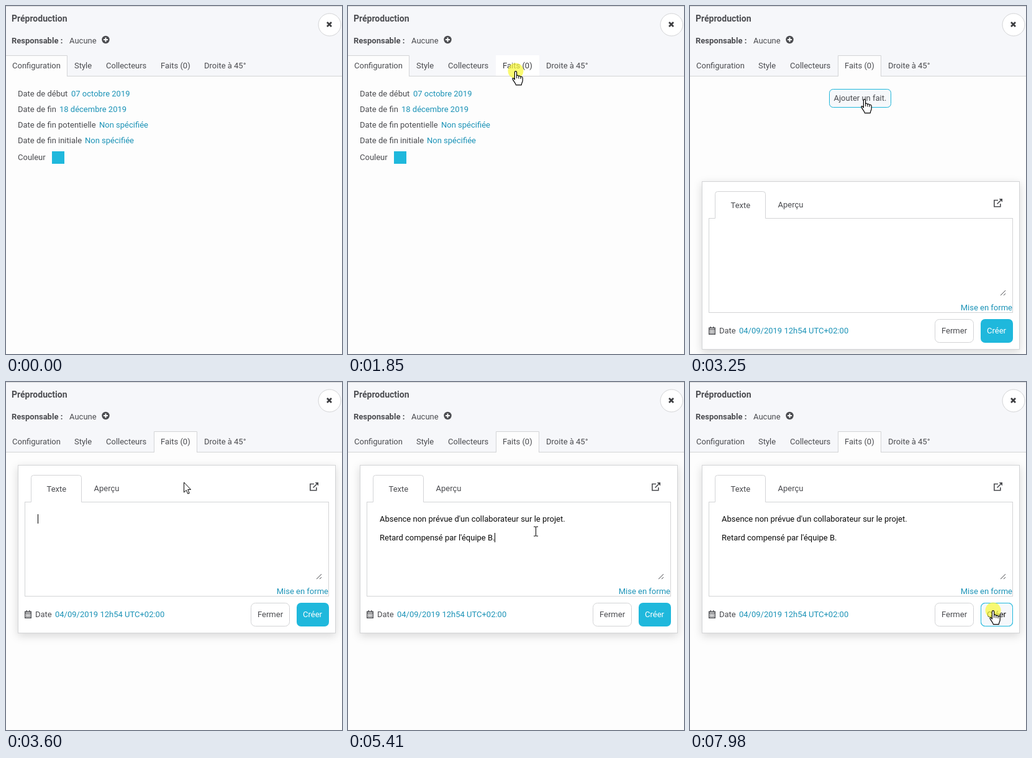
Animation, 541 px wide and 558 px high, one loop 8 s. Source, as an HTML page:

```html
<!DOCTYPE html>
<html lang="fr">
<head>
<meta charset="utf-8">
<style>
html, body { margin: 0; width: 100%; height: 100%; overflow: hidden; background: #fdfdfd; }
svg { display: block; font: 13px Roboto, sans-serif; fill: #4b4c50; }
.b { font-weight: 700; }
.link { fill: #1c93b7; }
.ink { fill: #0c0c0c; }
.box { fill: #fff; stroke: #d3d4d6; }
.hot { fill: #f6f8fb; stroke: #1fb8dc; }
.blue { fill: #1fb8dc; }
.line { fill: none; stroke: #d3d4d6; }
.icon { fill: none; stroke: #4b4c50; }
.cur { fill: #fff; stroke: #000; stroke-linejoin: round; }
#card { filter: drop-shadow(0 4px 7px rgba(0,0,0,.15)); }
</style>
</head>
<body>
<svg width="541" height="558" viewBox="0 0 541 558">
  <rect width="541" height="558" fill="#fdfdfd"/>
  <rect width="541" height="112" fill="#f6f7fa"/>
  <path class="line" d="M0 .5H541M0 112.5H541"/>
  <text class="b" x="9" y="25" font-size="14">Préproduction</text>
  <text class="b" x="9" y="60">Responsable :</text>
  <text x="102" y="60">Aucune</text>
  <circle cx="160.5" cy="54" r="6.2"/>
  <path d="M157 54H164M160.5 50.5V57.5" stroke="#fff" stroke-width="2"/>
  <circle class="box" cx="521" cy="30" r="18"/>
  <path d="M517 26L524 33M524 26L517 33" stroke="#3c3d40" stroke-width="2.7"/>

  <path id="tab1" d="M0 79.5H98.5V113H0" fill="#fdfdfd"/>
  <path id="edge1" class="line" d="M0 79.5H98.5V113"/>
  <rect id="tabHover" x="238" y="79" width="70" height="33" fill="#fff"/>
  <g id="tab4">
    <path d="M238.5 113V79.5H307.5V113" fill="#fdfdfd"/>
    <path class="line" d="M238.5 113V79.5H307.5V113"/>
  </g>
  <text x="10" y="100">Configuration</text>
  <text x="110" y="100">Style</text>
  <text x="161" y="100">Collecteurs</text>
  <text id="facts" x="249" y="100">Faits (0)</text>
  <text x="319" y="100">Droite à 45°</text>

  <g id="config">
    <text x="19" y="145">Date de début</text><text class="link" x="105" y="145">07 octobre 2019</text>
    <text x="19" y="170">Date de fin</text><text class="link" x="86" y="170">18 décembre 2019</text>
    <text x="19" y="195">Date de fin potentielle</text><text class="link" x="150" y="195">Non spécifiée</text>
    <text x="19" y="220">Date de fin initiale</text><text class="link" x="127" y="220">Non spécifiée</text>
    <text x="19" y="247">Couleur</text>
    <rect class="blue" x="74" y="233" width="20" height="20"/>
  </g>

  <g id="add">
    <rect class="box" x="224.5" y="133.5" width="99" height="29" rx="6"/>
    <rect id="addHover" class="hot" x="224.5" y="133.5" width="99" height="29" rx="6"/>
    <text x="231.5" y="152">Ajouter un fait.</text>
  </g>

  <g id="panel">
    <rect id="card" class="box" x="19.5" y="133.5" width="511" height="269"/>
    <rect class="line" x="30.5" y="192.5" width="489" height="151"/>
    <path class="box" d="M40.5 193.5V153.5Q40.5 149.5 44.5 149.5H117.5Q121.5 149.5 121.5 153.5V193.5" style="stroke:none"/>
    <path class="line" d="M40.5 192.5V153.5Q40.5 149.5 44.5 149.5H117.5Q121.5 149.5 121.5 153.5V192.5"/>
    <text x="65.5" y="176">Texte</text>
    <text x="141.5" y="175">Aperçu</text>
    <path class="icon" stroke-width="1.6" d="M496 163.5H489.8V173.7H499.8V169M494.5 169.5L501.5 162.5"/>
    <path d="M497.5 161H503V166.5Z"/>
    <path class="icon" d="M500 316L508 308M505 316L508 313"/>
    <text class="link" x="519" y="340" text-anchor="end">Mise en forme</text>
    <path class="icon" stroke-width="1.4" d="M30.7 368.2H40.3V378.3H30.7ZM30.7 370.6H40.3M33.3 366V369M37.7 366V369"/>
    <path class="icon" stroke-width="1.5" stroke-dasharray="1.5 1" d="M32.3 373.3H39M32.3 376H39"/>
    <text x="47" y="377">Date</text>
    <text class="link" x="79" y="377">04/09/2019 12h54 UTC+02:00</text>
    <rect class="box" x="394.5" y="354.5" width="62" height="37" rx="7"/>
    <text x="405" y="377">Fermer</text>
    <rect class="blue" x="468" y="354" width="52" height="38" rx="7"/>
    <text x="478" y="377" fill="#fff">Créer</text>
    <g id="okHover">
      <rect class="hot" x="468.5" y="354.5" width="51" height="37" rx="7"/>
      <text class="ink" x="478" y="377">Créer</text>
    </g>
    <g id="note" class="ink">
      <text x="51" y="224">Absence non prévue d'un collaborateur sur le projet.</text>
      <text x="51" y="254">Retard compensé par l'équipe B.</text>
    </g>
    <rect id="caret" width="1" height="15" fill="#000"/>
  </g>

  <g id="mouse">
    <circle id="click" r="12.5" fill="#f8f83c" opacity=".72"/>
    <path id="arrow" class="cur" d="M.5 .5V16.5L4.2 13L6.8 18.8L9.2 17.8L6.7 12H11.5Z"/>
    <g id="hand">
      <path class="cur" stroke-width="1.2" d="M-1.6 14V2.2C-1.6 0 1.6 0 1.6 2.2V8C2 6.8 4.8 7 4.8 8.8C5.5 7.7 8 8 8 9.8C9 8.8 11.2 9.4 11.2 11.4V15.5C11.2 18 9.5 19 9.2 22.6H.4C0 19.8-2.5 18-4.8 13.6C-5.8 11.4-3.5 10.4-1.6 14Z"/>
      <path class="cur" d="M1.6 8V12M4.8 9V12.5M8 10V13"/>
    </g>
    <path id="beam" d="M-3.5-7.5H-1Q0-7.5 0-6.5Q0-7.5 1-7.5H3.5M0-6.5V6.5M-3.5 7.5H-1Q0 7.5 0 6.5Q0 7.5 1 7.5H3.5" fill="none" stroke="#000"/>
  </g>
</svg>
<script>
const LOOP = 8000;
const $ = id => document.getElementById(id);
const show = (id, on) => { $(id).style.display = on ? '' : 'none'; };
const clamp = v => Math.max(0, Math.min(1, v));
const ramp = (t, start, ms) => clamp((t - start) / ms);
const within = (t, a, b) => t >= a && t < b;

const smooth = p => p * p * (3 - 2 * p);
const out = p => 1 - (1 - p) ** 2;
const into = p => p * p;

// time, x, y, easing used to get there
const path = [
  [160, 437, 550], [900, 268, 149, smooth], [1000, 268, 149], [1300, 270, 104, smooth],
  [2200, 270, 104], [2640, 281, 149, smooth], [3420, 281, 149], [3600, 286, 160, into],
  [3930, 294.5, 229, out], [4030, 294.5, 229], [4170, 288.5, 226, out], [5380, 288.5, 226],
  [5410, 302.5, 239.5, out], [5510, 302.5, 239.5], [5790, 373.5, 300, out], [6190, 373.5, 300],
  [6930, 449, 350, smooth], [7700, 488, 366, out]
];

function mouseAt(t) {
  const i = path.findIndex(k => k[0] > t);
  if (i < 1) return (i ? path[path.length - 1] : path[0]).slice(1, 3);
  const a = path[i - 1], b = path[i];
  const p = (b[3] || smooth)(ramp(t, a[0], b[0] - a[0]));
  return [a[1] + (b[1] - a[1]) * p, a[2] + (b[2] - a[2]) * p];
}

function cursorKind(t, x, y) {
  if (t < 3480) return y < 112 || (t > 1950 && y > 133) ? 'hand' : 'arrow';
  if (x >= 468 && y >= 354) return 'hand';
  return y > 193 && y < 328 ? 'beam' : 'arrow';
}

function caretOn(t) {
  if (t < 4900) return within(t, 3500, 4030) || t >= 4560;
  return t < 5790 || Math.floor((t - 5790) / 547.5) % 2 === 1;
}

function draw(t) {
  const [x, y] = mouseAt(t);
  const kind = cursorKind(t, x, y);
  const opened = t >= 1950, typed = t >= 4900;

  show('tab1', !opened);
  show('edge1', !opened);
  show('config', !opened);
  show('tab4', opened);
  show('add', opened);
  show('tabHover', !opened && t > 1000 && y < 112);
  $('facts').style.fill = t > 1000 && y < 112 ? '#3a3b3e' : '';
  $('addHover').style.opacity = ramp(t, 2640, 180);

  show('panel', t >= 3180);
  const drop = 420 * (1 - ramp(t, 3180, 310)) ** 4;
  $('panel').setAttribute('transform', `translate(0 ${Math.round(drop)})`);
  show('note', typed);
  show('caret', t >= 3500 && caretOn(t));
  $('caret').setAttribute('x', typed ? 236 : 51);
  $('caret').setAttribute('y', typed ? 242 : 212);
  $('okHover').style.opacity = ramp(t, 7190, 150);

  show('mouse', t >= 160 && !within(t, 4900, 5130));
  $('mouse').setAttribute('transform', `translate(${x} ${y})`);
  for (const k of ['arrow', 'hand', 'beam']) show(k, k === kind);
  show('click', within(t, 1850, 2050) || within(t, 3160, 3230) || t >= 7980);
}

const start = performance.now();
function tick() {
  draw((performance.now() - start) % LOOP);
  requestAnimationFrame(tick);
}
tick();
</script>
</body>
</html>
```
